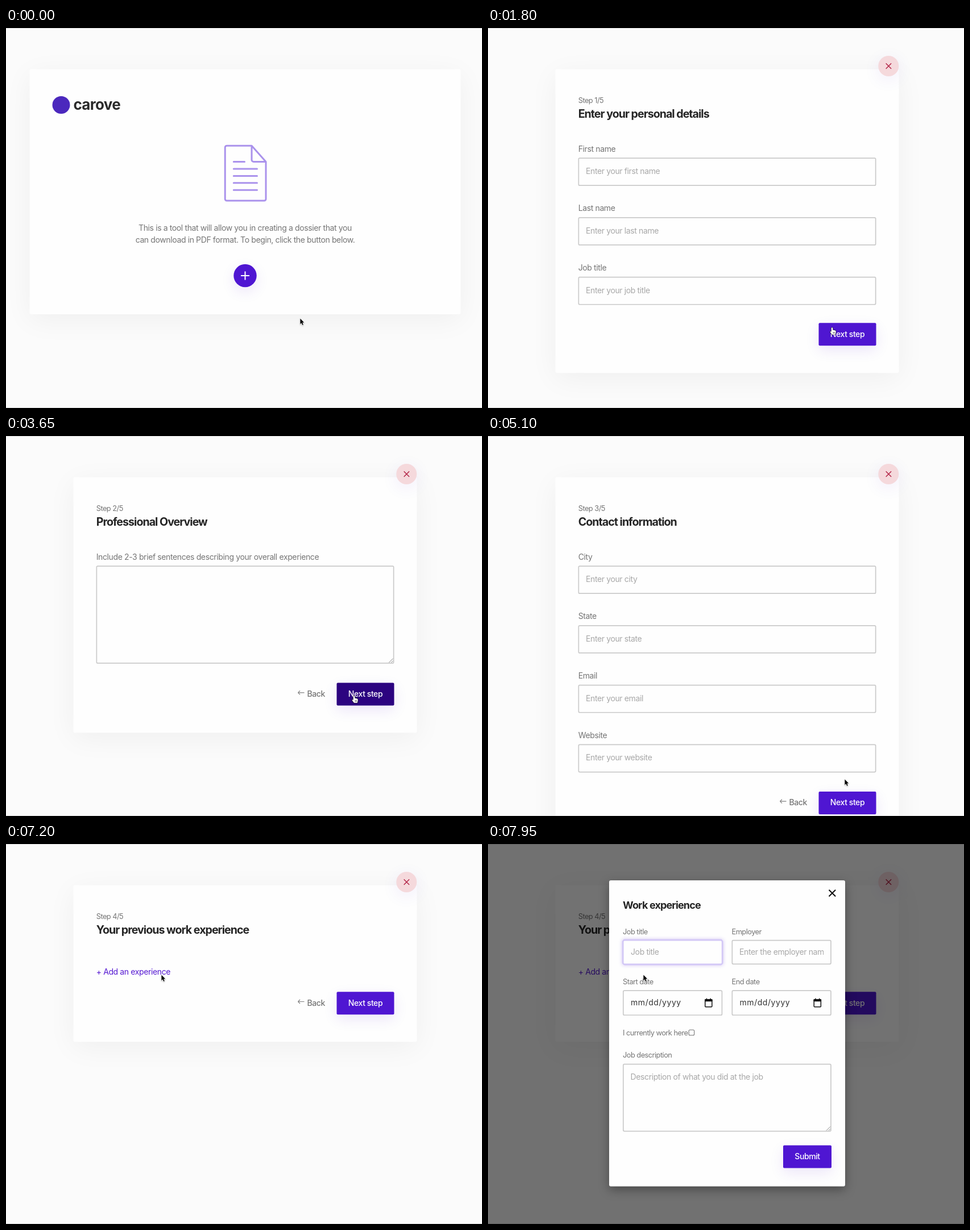
Recreate the animation shown at these times as an HTML page with a canvas. Size 837x669 px, loop 8000 ms.

```html
<!DOCTYPE html>
<html lang="en">
<head>
<meta charset="utf-8">
<title>Builder walkthrough</title>
<style>
html, body { margin: 0; width: 100%; height: 100%; overflow: hidden; background: #fbfbfb; }
canvas { display: block; width: 837px; height: 669px; }
</style>
</head>
<body>
<canvas id="stage"></canvas>
<script>
const W = 837, H = 669, LOOP = 8000;
const PURPLE = [79, 22, 210], DARK = [44, 4, 128];
const GREY = '#757575', INK = '#252525', HINT = '#a8a8a8', LINE = '#cacaca';
const rgb = c => `rgb(${c.map(Math.round)})`;
const dpr = window.devicePixelRatio || 1;

// Weight, size, letter spacing
const STYLES = {
  body: [400, 14, -0.38],
  button: [500, 14, -0.42],
  small: [400, 12.8, -0.52],
  title: [700, 19.6, -0.98],
  heading: [700, 18, -0.85],
  date: [400, 14, 0.55],
  brand: [700, 26, -0.7]
};

function makeContext(canvas) {
  canvas.width = W * dpr;
  canvas.height = H * dpr;
  const c = canvas.getContext('2d');
  c.scale(dpr, dpr);
  return c;
}
const page = makeContext(document.getElementById('stage'));
const layer = makeContext(document.createElement('canvas'));
let ctx = page;

const clamp = x => Math.max(0, Math.min(1, x));
const smooth = x => x * x * (3 - 2 * x);
const lerp = (a, b, u) => a + (b - a) * u;

function text(str, x, y, style, color, align = 'left') {
  const [weight, size, spacing] = STYLES[style];
  ctx.font = `${weight} ${size}px Inter, "Open Sans", sans-serif`;
  ctx.letterSpacing = spacing + 'px';
  ctx.textAlign = align;
  ctx.fillStyle = color;
  ctx.fillText(str, x, y);
}

function shadow(color, blur, dy) {
  ctx.shadowColor = color;
  ctx.shadowBlur = blur * dpr;
  ctx.shadowOffsetY = dy * dpr;
}
const noShadow = () => shadow('transparent', 0, 0);

function box(x, y, w, h, r, fill) {
  ctx.beginPath();
  ctx.roundRect(x, y, w, h, r);
  ctx.fillStyle = fill;
  ctx.fill();
}

function frame(x, y, w, h, color = LINE, width = 1.7, r = 2) {
  ctx.beginPath();
  ctx.roundRect(x + width / 2, y + width / 2, w - width, h - width, r);
  ctx.strokeStyle = color;
  ctx.lineWidth = width;
  ctx.stroke();
}

// Each segment is x1, y1, x2, y2
function lines(color, width, ...segments) {
  ctx.beginPath();
  for (const [x1, y1, x2, y2] of segments) {
    ctx.moveTo(x1, y1);
    ctx.lineTo(x2, y2);
  }
  ctx.strokeStyle = color;
  ctx.lineWidth = width;
  ctx.stroke();
}

function disc(x, y, r, fill) {
  ctx.beginPath();
  ctx.arc(x, y, r, 0, 7);
  ctx.fillStyle = fill;
  ctx.fill();
}

function cross(x, y, r, color, width) {
  lines(color, width, [x - r, y - r, x + r, y + r], [x - r, y + r, x + r, y - r]);
}

function grip(x, y) {
  lines('#777', 0.9, [x - 7, y, x, y - 7], [x - 3, y, x, y - 3]);
}

function card(x, y, w, h) {
  shadow('rgba(0,0,0,0.05)', 50, 10);
  box(x, y, w, h, 3, '#fefefe');
  noShadow();
}

function button(label, x, y, w, fill) {
  shadow('rgba(79,22,210,0.1)', 24, 8);
  box(x, y, w, 40, 2, fill);
  noShadow();
  text(label, x + w / 2, y + 24.5, 'button', '#fff', 'center');
}

function drawIntro(fill) {
  card(41.5, 72.5, 758, 431.5);
  disc(97, 135.5, 15.5, '#4b28bd');
  text('carove', 118.5, 144, 'brand', '#2b2b2b');

  ctx.lineCap = ctx.lineJoin = 'round';
  ctx.strokeStyle = '#aa92ec';
  ctx.lineWidth = 3;
  ctx.beginPath();
  ctx.moveTo(432, 207.2);
  ctx.lineTo(388, 207.2);
  ctx.arcTo(385.2, 207.2, 385.2, 210, 3);
  ctx.lineTo(385.2, 301);
  ctx.arcTo(385.2, 304, 388, 304, 3);
  ctx.lineTo(454, 304);
  ctx.arcTo(457, 304, 457, 301, 3);
  ctx.lineTo(457, 235.5);
  ctx.closePath();
  ctx.moveTo(432, 207.2);
  ctx.lineTo(432, 232);
  ctx.arcTo(432, 235.5, 436, 235.5, 3.5);
  ctx.lineTo(457, 235.5);
  ctx.stroke();
  const rows = [0, 1, 2, 3, 4].map(i => [400.3, 235.5 + i * 12.45, i ? 441.5 : 419.5, 235.5 + i * 12.45]);
  lines('#aa92ec', 3, ...rows);
  ctx.lineCap = 'butt';
  ctx.lineJoin = 'miter';

  text('This is a tool that will allow you in creating a dossier that you', 420.5, 357, 'body', GREY, 'center');
  text('can download in PDF format. To begin, click the button below.', 420.5, 378, 'body', GREY, 'center');

  shadow('rgba(79,22,210,0.1)', 24, 8);
  disc(420.5, 436, 20.2, fill);
  noShadow();
  lines('#fff', 2, [413, 436, 428, 436], [420.5, 428.5, 420.5, 443.5]);
}

function drawStep(n, fill) {
  const { title, fields, top } = STEPS[n - 1];
  card(118.5, 72.5, 604, top + 88 - 72.5);
  shadow('rgba(79,22,210,0.08)', 30, 6);
  disc(704.3, 67, 18, '#f5d9dc');
  noShadow();
  cross(704.4, 67, 4.7, '#b32648', 1.5);
  text(`Step ${n}/5`, 158.7, 131.5, 'small', GREY);
  text(title, 158.7, 158, 'title', INK);

  fields.forEach(([label, hint], i) => {
    const y = 228.2 + i * 104.8;
    text(label, 158.7, y - 10.7, 'body', GREY);
    frame(158.5, y, 524, 49.8);
    text(hint, 172, y + 28.8, 'body', HINT);
  });
  if (n === 2) {
    text('Include 2-3 brief sentences describing your overall experience', 158.7, 217.5, 'body', GREY);
    frame(158.5, 228.2, 524, 172.6);
    grip(680.5, 398.8);
  }
  if (n === 4) text('+ Add an experience', 158.7, 230, 'body', '#5518d2');
  if (n > 1) {
    const y = top + 17.3;
    lines('#808080', 1.2, [513.5, y, 524.5, y], [517, y - 3.5, 513.5, y], [513.5, y, 517, y + 3.5]);
    text('Back', 529.5, top + 24.5, 'button', GREY);
  }
  button('Next step', 581.5, top, 101, fill);
}

const STEPS = [
  { title: 'Enter your personal details', top: 519.3, fields: [
    ['First name', 'Enter your first name'],
    ['Last name', 'Enter your last name'],
    ['Job title', 'Enter your job title']] },
  { title: 'Professional Overview', top: 434.5, fields: [] },
  { title: 'Contact information', top: 625.9, fields: [
    ['City', 'Enter your city'],
    ['State', 'Enter your state'],
    ['Email', 'Enter your email'],
    ['Website', 'Enter your website']] },
  { title: 'Your previous work experience', top: 260.2, fields: [] }
];

function dateField(label, x) {
  text(label, x, 246.5, 'small', GREY);
  frame(x, 257.3, 175.3, 44.8);
  text('mm/dd/yyyy', x + 14, 284.3, 'date', '#333');
  const cx = x + 144;
  frame(cx, 273.3, 13.6, 14.2, '#111', 1.5, 1);
  box(cx, 273.3, 13.6, 4, 1, '#111');
  lines('#111', 1.6, [cx + 3.4, 271.7, cx + 3.4, 275], [cx + 10.2, 271.7, cx + 10.2, 275]);
}

function drawDialog(caret) {
  shadow('rgba(0,0,0,0.35)', 18, 6);
  box(213, 64, 415, 538.8, 3, '#fefefe');
  noShadow();
  cross(605.3, 86.5, 5.8, '#111', 2);
  text('Work experience', 237, 113.5, 'heading', INK);

  text('Job title', 237, 158.5, 'small', GREY);
  shadow('rgba(79,22,210,0.25)', 6, 0);
  box(236, 167.8, 177.4, 45.4, 3, '#fefefe');
  noShadow();
  frame(235.8, 167.6, 177.8, 45.8, '#d3c8f6', 2.8, 3);
  text('Job title', 251, 194.8, 'body', HINT);
  if (caret) lines('#333', 1, [251.5, 182.5, 251.5, 197.5]);

  text('Employer', 428.5, 158.5, 'small', GREY);
  frame(428.5, 168.8, 175.3, 43.4);
  ctx.save();
  ctx.beginPath();
  ctx.rect(441, 170, 149, 40);
  ctx.clip();
  text('Enter the employer name', 442, 194.8, 'body', HINT);
  ctx.restore();

  dateField('Start date', 237);
  dateField('End date', 428.5);
  text('I currently work here', 237, 336.8, 'small', GREY);
  frame(352.6, 326.7, 10.6, 10.6, '#767676', 1.1, 2);

  text('Job description', 237, 376.3, 'small', GREY);
  frame(237, 386.8, 366.8, 119.6);
  text('Description of what you did at the job', 250.5, 415.3, 'body', HINT);
  grip(602, 504.5);
  button('Submit', 519, 530.6, 85, rgb(PURPLE));
}

// Screens: start time and when the pointer enters its button
const SCREENS = [[0, 500], [950, 1785], [2200, 3330], [3900, 5170], [5600, Infinity]];

// Pointer keys: time, x, y
const PATH = [
  [100, 517, 511], [650, 425, 438], [1350, 425, 438], [1800, 605, 527], [1950, 612, 538],
  [3050, 612, 538], [3520, 612, 457], [4750, 612, 457], [5100, 627, 604], [5300, 627, 638],
  [6350, 627, 638], [6600, 338, 257], [6750, 338, 257], [7080, 273, 230]
];

function pointerAt(t) {
  const i = PATH.findIndex(k => k[0] > t);
  if (i < 0) return PATH[PATH.length - 1].slice(1);
  if (i === 0) return PATH[0].slice(1);
  const a = PATH[i - 1], b = PATH[i];
  const u = smooth((t - a[0]) / (b[0] - a[0]));
  return [lerp(a[1], b[1], u), lerp(a[2], b[2], u)];
}

const ARROW = new Path2D('M.4 .4V10.4L2.6 8.3L4.2 12L5.8 11.3L4.2 7.6H7.2Z');
const HAND = new Path2D('M-1.3 1.1Q0 -.6 1.3 1.1V4.6L5.6 5.4Q7 5.9 6.8 8L5.8 12.8H0L-3.3 8.4Q-3.6 6.4 -1.3 7.6Z');

function drawPointer(t, hand) {
  ctx.save();
  ctx.translate(...pointerAt(t));
  ctx.lineJoin = 'round';
  shadow('rgba(0,0,0,0.25)', 2, 1);
  ctx.lineWidth = hand ? 1.1 : 1.4;
  ctx.strokeStyle = hand ? '#111' : '#fff';
  ctx.fillStyle = hand ? '#fff' : '#000';
  ctx.stroke(hand ? HAND : ARROW);
  noShadow();
  ctx.fill(hand ? HAND : ARROW);
  if (hand) lines('#111', 0.7, [2.2, 8, 2.2, 11], [4.2, 8, 4.2, 11]);
  ctx.restore();
}

const DIALOG = 7225;

function render(t) {
  ctx = page;
  ctx.fillStyle = '#fbfbfb';
  ctx.fillRect(0, 0, W, H);

  const n = SCREENS.filter(s => s[0] <= t).length - 1;
  const hoverAt = SCREENS[n][1];
  const glow = smooth(clamp((t - hoverAt) / 300));
  const fill = rgb(PURPLE.map((c, i) => lerp(c, DARK[i], glow)));
  if (n) drawStep(n, fill);
  else drawIntro(fill);

  ctx.fillStyle = '#d9d9d9';
  ctx.fillRect(0, 0, W, 1);
  ctx.fillRect(0, 668, W, 1);

  if (t > DIALOG) {
    const u = clamp((t - DIALOG) / 250);
    const show = 1 - (1 - u) ** 2;
    ctx.fillStyle = `rgba(0,0,0,${0.55 * show})`;
    ctx.fillRect(0, 0, W, H);

    ctx = layer;
    ctx.clearRect(0, 0, W, H);
    drawDialog(t < DIALOG + 500);
    ctx = page;
    const s = 0.96 + 0.04 * show, cx = 420.6, cy = 333.6;
    ctx.globalAlpha = show;
    ctx.drawImage(layer.canvas, cx - cx * s, cy - cy * s, W * s, H * s);
    ctx.globalAlpha = 1;
  }
  drawPointer(t, t >= hoverAt);
}

const start = performance.now();
function tick() {
  render((performance.now() - start) % LOOP);
  requestAnimationFrame(tick);
}
tick();
</script>
</body>
</html>
```
